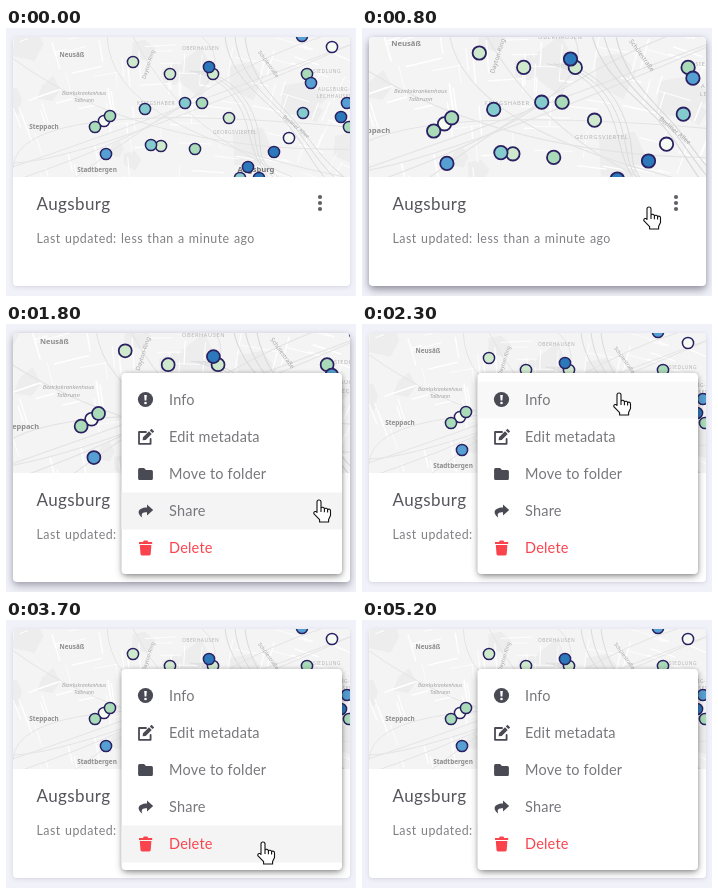
These frames come from a looping animation (350x268 px, 5.3 s). An HTML page:

```html
<!DOCTYPE html>
<html lang="en">
<head>
<meta charset="utf-8">
<title>Map card menu</title>
<style>
html, body { margin: 0; width: 100%; height: 100%; overflow: hidden; background: #f1f1f9; }
svg { display: block; width: 350px; height: 268px; font-family: Lato, "Open Sans", sans-serif; }
.title { font-size: 17px; letter-spacing: .4px; fill: #55555c; }
.sub { font-size: 12.4px; letter-spacing: .48px; word-spacing: .6px; fill: #808085; }
.item { font-size: 14.5px; letter-spacing: .2px; fill: #77777c; }
.line { fill: none; stroke-linecap: round; stroke-linejoin: round; }
.map text { text-anchor: middle; font-family: "Noto Sans", sans-serif; }
.area { font-size: 4.9px; letter-spacing: .5px; fill: #b4b4b4; }
.town { font-size: 6.4px; font-weight: 600; fill: #8d8d8d; }
.city { font-size: 7.6px; font-weight: 600; fill: #777; }
.place { font-size: 5px; font-style: italic; fill: #a2a2a2; }
.road { font-size: 5.2px; fill: #a4a4a4; }
</style>
</head>
<body>
<svg viewBox="0 0 350 268">
  <defs>
    <clipPath id="frame"><path d="M7 149V13a4 4 0 0 1 4-4H340a4 4 0 0 1 4 4V149z"/></clipPath>
    <filter id="soft" x="-20%" y="-20%" width="140%" height="140%"><feGaussianBlur stdDeviation="2"/></filter>
    <filter id="wide" x="-20%" y="-20%" width="140%" height="140%"><feGaussianBlur stdDeviation="4.5"/></filter>
  </defs>
  <rect width="350" height="268" fill="#f1f1f9"/>
  <rect x="7" y="10" width="337" height="249" rx="4" fill="#808098" opacity=".25" filter="url(#soft)"/>
  <rect id="lift" x="7" y="13" width="337" height="249" rx="4" fill="#48485a" filter="url(#wide)"/>
  <rect x="7" y="9" width="337" height="249" rx="4" fill="#fff"/>
  <g clip-path="url(#frame)">
    <g id="map" class="map">
      <rect x="7" y="9" width="337" height="140" fill="#f4f4f4"/>
      <g id="blocks" fill="#ededed"/>
      <g id="streets" class="line" stroke="#fff"/>
      <g id="roads" class="line" stroke="#e4e4e4"/>
      <g id="rails" class="line" stroke="#d9dadb"/>
      <g id="labels"/>
      <g id="dots" stroke="#2a2062" stroke-width="1.5"/>
    </g>
  </g>
  <text class="title" x="30.5" y="181.5">Augsburg</text>
  <text class="sub" x="30.5" y="215">Last updated: less than a minute ago</text>
  <circle id="halo" cx="314" cy="175" r="18" fill="#f5f5f6"/>
  <g id="kebab" fill="#606068"/>
  <g id="menu">
    <rect x="117" y="53" width="218" height="199" rx="4" fill="#222" opacity=".4" filter="url(#wide)"/>
    <rect x="116" y="50" width="220" height="201" rx="4" fill="#222" opacity=".3" filter="url(#soft)"/>
    <rect x="115.5" y="49" width="220.5" height="201" rx="4" fill="#fff"/>
    <g id="rows"/>
    <g fill="#4a4a55">
      <circle cx="139.5" cy="75.5" r="7.6"/>
      <path d="M138.2 71h2.6l-.4 5.4h-1.8z" fill="#fff"/><circle cx="139.5" cy="79" r="1.3" fill="#fff"/>
      <path class="line" d="M140 108H133V119.8H144.6V115" stroke="#4a4a55" stroke-width="1.8"/>
      <path d="M136.6 116.2 137 113.2 143 107.2 145.7 109.9 139.7 115.9zM143.8 106.4 145.5 104.8 148.2 107.5 146.5 109.1z"/>
      <path d="M133.6 144H138l2 2h5.4a1.5 1.5 0 0 1 1.5 1.5V154.5a1.5 1.5 0 0 1-1.5 1.5H133.6a1.5 1.5 0 0 1-1.5-1.5V145.5a1.5 1.5 0 0 1 1.5-1.5z"/>
      <path d="M141 180.6 147.2 186 141 191.4V188.3C136.6 188.3 134.8 189.5 136.2 193.4 131 190 130.8 183.8 141 183.6z"/>
    </g>
    <path d="M133 218H137l.8-1.4h3.6l.8 1.4h4V220H133zM133.8 221H145.4L144.7 230a1.5 1.5 0 0 1-1.5 1.4H136a1.5 1.5 0 0 1-1.5-1.4z" fill="#f9444e"/>
  </g>
  <path id="hand" d="M-2 12.5V2a2 2 0 0 1 4 0V8.2a1.8 1.6 0 0 1 3.4.6a1.8 1.6 0 0 1 3.2.9a1.7 1.7 0 0 1 2.9 1.3V15.5L9.6 19.4V22H.6V19.6L-5.2 13.6a1.7 1.7 0 0 1 3.2-1.1zM2 8.2V12M5.4 9V12.2M8.6 10V12.6" fill="#fff" stroke="#111" stroke-width="1.1" stroke-linejoin="round"/>
</svg>
<script>
const LOOP = 5300, STEP = 100, ROW = 37;
const $ = id => document.getElementById(id);
const clamp = v => Math.min(1, Math.max(0, v));
const ease = p => p * p * (3 - 2 * p);
const ramp = (t, from, to) => ease(clamp((t - from) / (to - from)));

function add(parent, tag, attrs, text) {
  const el = document.createElementNS("http://www.w3.org/2000/svg", tag);
  for (const k in attrs) el.setAttribute(k, attrs[k]);
  if (text) el.textContent = text;
  $(parent).appendChild(el);
  return el;
}

// Map ground: seeded blocks, streets and roads
let seed = 11;
const rnd = () => (seed = seed * 16807 % 2147483647) / 2147483647;
const across = () => 7 + rnd() * 337, down = () => 9 + rnd() * 140;

for (let i = 0; i < 14; i++) {
  const x = across(), y = down(), r = 10 + rnd() * 14;
  const corners = [0, 1, 2, 3, 4].map(k => {
    const a = k * Math.PI * .4, d = r * (.6 + rnd() * .6);
    return `${x + d * Math.cos(a)},${y + d * Math.sin(a)}`;
  });
  add("blocks", "polygon", { points: corners.join(" ") });
}
for (let i = 0; i < 110; i++) {
  const len = 8 + rnd() * 24, x = across(), a = -.4 + x / 400 + (i % 2) * Math.PI / 2;
  add("streets", "path", {
    d: `M${x} ${down()}l${len * Math.cos(a)} ${len * Math.sin(a)}`,
    "stroke-width": .6 + rnd() * .8
  });
}
for (let i = 0; i < 8; i++) {
  const d = i % 2
    ? `M7 ${down()}Q${across()} ${down()} 344 ${down()}`
    : `M${across()} 9Q${across()} ${down()} ${across()} 149`;
  add("roads", "path", { d });
}
for (let i = 0; i < 3; i++) {
  const k = i * 5;
  add("rails", "path", { d: `M${219 + 2 * k} 9C${224 + 2 * k} 50 ${256 + k} 68 ${276 + k} 90S${300 + k} 126 ${318 + 2 * k} 149` });
  add("rails", "path", { d: `M${184 + k} 43C${216 + k} 48 ${234 + k} 72 ${241 + k} 98S248 128 ${262 + k} 149`, "stroke-width": .8 });
}

// Labels: text, x, y, turn
const LABELS = {
  town: [["Neusäß", 66, 28.5], ["Steppach", 38, 101], ["Stadtbergen", 91, 143.5]],
  city: [["Augsburg", 250, 143.5]],
  area: [["OBERHAUSEN", 194.5, 22], ["KRIEGSHABER", 150, 77], ["GEORGSVIERTEL", 229, 105.5],
    ["SIEDLUNG", 321, 45], ["AUGSBURG-", 328, 63], ["LECHHAUSEN", 329, 70]],
  place: [["Bezirkskrankenhaus", 78, 67], ["Talbrunn", 78, 74]],
  road: [["Dayton-Ring", 144, 37, -72], ["Schülestraße", 261, 37, 54], ["Berliner Allee", 289, 100, 40]]
};
for (const cls in LABELS)
  for (const [s, x, y, turn = 0] of LABELS[cls])
    add("labels", "text", { class: cls, x, y, transform: `rotate(${turn} ${x} ${y})` }, s);

// Places on the map, grouped by colour
const PLACES = {
  "#f5fbf2": [[98, 93], [283, 110], [326, 19]],
  "#cfe9cc": [[127, 34], [164, 46], [207, 46], [223, 90], [155, 118]],
  "#a9dbb8": [[196, 75], [89, 99], [104, 88], [189, 121], [301, 46], [343, 99]],
  "#83cbcc": [[139, 81], [179, 75], [145, 117], [297, 85], [234, 150]],
  "#559fd2": [[100, 126], [305, 55], [296, 8], [341, 75]],
  "#2b78ba": [[203, 39], [268, 124], [335, 89], [253, 150], [242, 139]]
};
for (const fill in PLACES)
  for (const [cx, cy] of PLACES[fill]) add("dots", "circle", { cx, cy, r: 5.6, fill });

for (const cy of [169, 175, 181]) add("kebab", "circle", { cx: 314, cy, r: 2.1 });

const bars = ["Info", "Edit metadata", "Move to folder", "Share", "Delete"].map((label, i) => {
  const mid = 76 + i * ROW;
  const bar = add("rows", "rect", { x: 115.5, y: mid - ROW / 2, width: 220.5, height: ROW, fill: "#f4f4f4" });
  const text = add("menu", "text", { class: "item", x: 163, y: mid + 5 }, label);
  if (label === "Delete") text.style.fill = "#f9444e";
  return { bar, mid };
});

// Pointer stops: time, x, y
const STOPS = [
  [150, 356, 272], [800, 287, 179], [1000, 287, 179], [1400, 313, 176], [1800, 313, 176],
  [2300, 257, 69], [2600, 257, 69], [3550, 257, 222], [3750, 257, 222], [4200, 346, 251], [4350, 362, 278]
];
function pointer(t) {
  let [, x, y] = STOPS[0];
  for (let i = 1; i < STOPS.length; i++) {
    const [from, x0, y0] = STOPS[i - 1], [to, x1, y1] = STOPS[i], p = ramp(t, from, to);
    x += (x1 - x0) * p;
    y += (y1 - y0) * p;
  }
  return [x, y];
}

function draw(t) {
  const brush = .4 * Math.sin(Math.PI * clamp((t - 3950) / 500));
  const hover = ramp(t, 250, 650) - ramp(t, 1700, 2050) + brush;
  const open = ramp(t, 1650, 1800), [x, y] = pointer(t);
  $("map").setAttribute("transform", `translate(175.5 79) scale(${1 + .2 * hover}) translate(-175.5 -79)`);
  $("lift").setAttribute("opacity", .5 * hover);
  $("halo").setAttribute("opacity", ramp(t, 1250, 1400) - ramp(t, 1900, 2000));
  $("menu").setAttribute("opacity", open);
  $("menu").setAttribute("transform", `translate(336 175) scale(${.8 + .2 * open}) translate(-336 -175)`);
  // Highlights trail the pointer a little
  const lagged = pointer(t - 150)[1];
  for (const { bar, mid } of bars)
    bar.setAttribute("opacity", clamp((ROW / 2 - Math.abs(lagged - mid)) / 4));
  $("hand").setAttribute("transform", `translate(${x} ${y})`);
}

const start = performance.now();
function tick(now) {
  const t = Math.max(0, now - start) % LOOP;
  draw(Math.floor(t / STEP) * STEP);
  requestAnimationFrame(tick);
}
draw(0);
requestAnimationFrame(tick);
</script>
</body>
</html>
```
